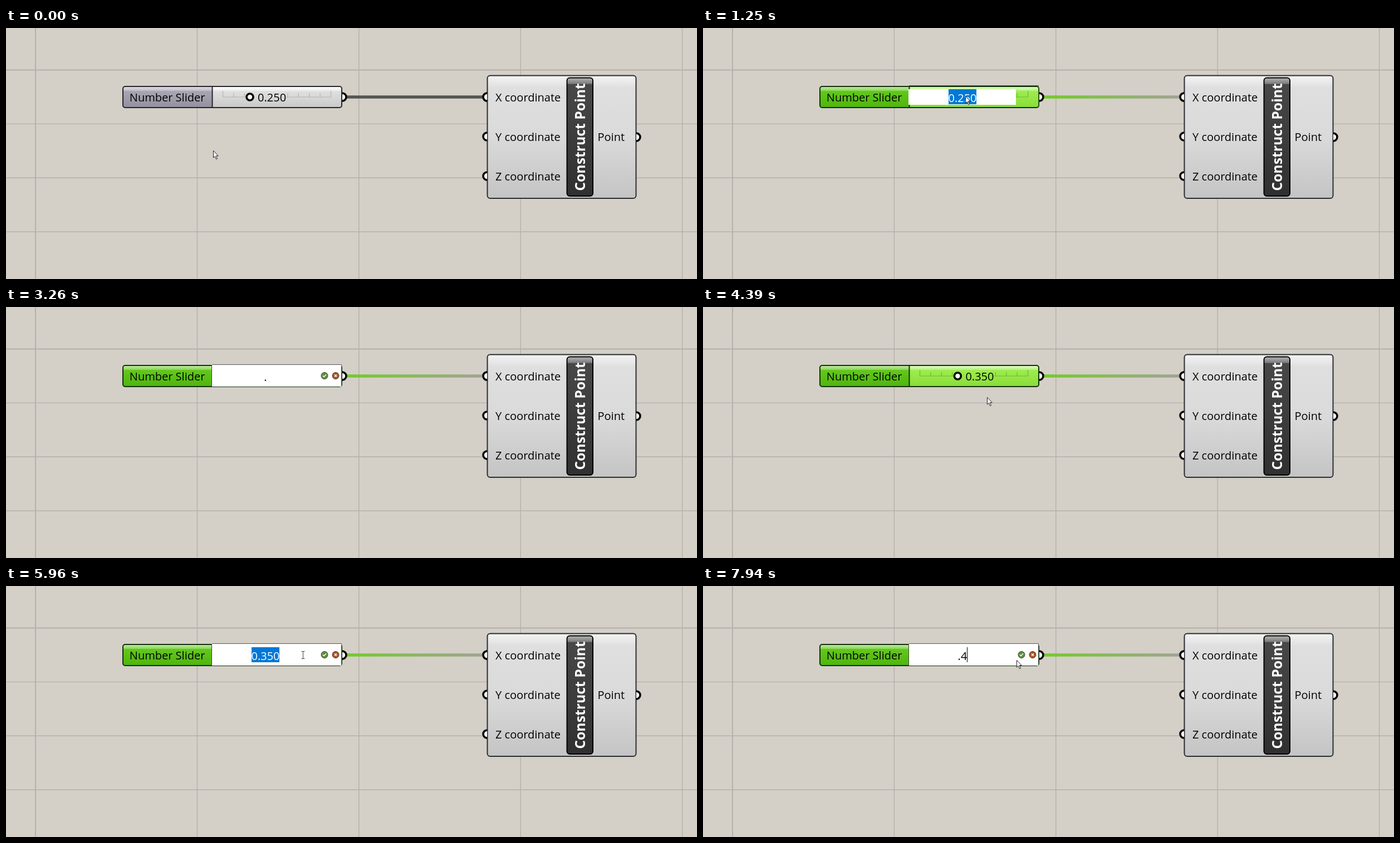
These frames come from a looping animation (1241 by 451 pixels, 8000 ms). An HTML page:

```html
<!DOCTYPE html>
<html lang="en">
<head>
<meta charset="utf-8">
<title>Number slider</title>
<style>
  html, body { margin: 0; width: 100%; height: 100%; overflow: hidden; background: #d4cfc7; }
  svg { display: block; width: 100%; height: 100%; }
  text { font: 20px "Open Sans", "Noto Sans", sans-serif; fill: #000; }
  .name { font-size: 24.8px; font-weight: 700; fill: #fff; }
  .selected { fill: #fff; }
</style>
</head>
<body>
<svg id="stage" viewBox="0 0 1241 451">
  <defs id="defs"></defs>
  <g id="back"></g>
  <g id="slider"></g>
  <g id="editor"></g>
  <g id="pointer"></g>
</svg>
<script>
const LOOP = 8000;
const TRACK = { x: 389.5, width: 194, y: 124 };
const EDIT_CENTER = 466;

// Pointer path: time, x, y
const PATH = [
  [230, 372, 220], [860, 471, 122], [1320, 471, 122], [1720, 510, 162],
  [5250, 510, 162], [5320, 511, 148], [5590, 524, 124], [5850, 524, 124],
  [5960, 533, 124], [6090, 537, 124], [6150, 543, 142], [7935, 543, 142], [7940, 563, 133]
];

// Field content while editing: time, text, selected, caret
const EDITS = [
  [1250, "0.250", true, false], [2050, "0.250", true, true], [2580, "0.250", true, false],
  [2710, ".", false, true], [3260, ".", false, false], [3330, ".3", false, true],
  [3530, ".35", false, true], [4060, ".35", false, false],
  [5780, "0.350", true, false], [6750, "0.350", true, true],
  [7080, ".", false, true], [7540, ".4", false, true]
];

const $ = id => document.getElementById(id);
const between = (t, a, b) => t >= a && t < b;
const rect = (x, y, w, h, fill, extra = "") =>
  `<rect x="${x}" y="${y}" width="${w}" height="${h}" fill="${fill}" ${extra}/>`;
const path = (d, stroke, width = 1) =>
  `<path d="${d}" fill="none" stroke="${stroke}" stroke-width="${width}"/>`;
const label = (x, y, s, extra = "") => `<text x="${x}" y="${y}" ${extra}>${s}</text>`;
const gradient = (id, stops, attrs = 'x2="0" y2="1"') =>
  `<linearGradient id="${id}" ${attrs}>` +
  stops.map(([at, color]) => `<stop offset="${at}" stop-color="${color}"/>`).join("") +
  "</linearGradient>";

// Half-round connector; side is 1 for outputs and -1 for inputs
const port = (x, y, side) =>
  `<path d="M${x} ${y - 7}a7 7 0 0 ${side > 0 ? 1 : 0} 0 14" fill="#fff" stroke="#000" stroke-width="3.6"/>`;

function drawDefs() {
  $("defs").innerHTML =
    gradient("panel", [[0, "#f4f4f4"], [.06, "#e8e8e8"], [.1, "#dfdfdf"], [.5, "#dadada"], [1, "#c4c4c4"]]) +
    gradient("plate", [[0, "#b4b4b4"], [.05, "#7c7c7c"], [.055, "#484848"], [1, "#303030"]]) +
    gradient("nameGrey", [[0, "#e2e1e6"], [.2, "#c0bdc8"], [.22, "#a9a6b4"], [1, "#94909f"]]) +
    gradient("bodyGrey", [[0, "#ffffff"], [.2, "#ececec"], [.22, "#e0e0e0"], [1, "#c9c9c9"]]) +
    gradient("nameGreen", [[0, "#c4eea6"], [.2, "#8cd75a"], [.22, "#62c81c"], [1, "#50b40e"]]) +
    gradient("bodyGreen", [[0, "#e2fdcb"], [.2, "#b4f37c"], [.22, "#9dec50"], [1, "#89dd37"]]) +
    gradient("wire", [[0, "#72cb27"], [1, "#a0a394"]],
      'gradientUnits="userSpaceOnUse" x1="611" y1="0" x2="857" y2="0"');
}

function drawBack() {
  let s = "";
  for (let i = 0; i < 5; i++) s += path(`M${53 + i * 290.4} 0V451`, "#b5b1aa", i ? 1.4 : 2);
  for (let i = 0; i < 4; i++) s += path(`M0 ${75.5 + i * 96.9}H1241`, "#b5b1aa", i ? 1.4 : 2);
  s += rect(864.5, 85.5, 267, 220.5, "url(#panel)", 'rx="5" stroke="#2b2c33" stroke-width="2"');
  s += rect(1007.5, 89.5, 46.5, 212.5, "url(#plate)", 'rx="5" stroke="#000" stroke-width="2"');
  s += label(0, 0, "Construct Point", 'class="name" text-anchor="middle" transform="translate(1040 196) rotate(-90)"');
  ["X", "Y", "Z"].forEach((axis, i) => {
    s += label(879, 131.5 + i * 71, axis + " coordinate");
    s += port(864, 124 + i * 71, -1);
  });
  s += label(1062.5, 203, "Point") + port(1132, 196, 1);
  $("back").innerHTML = s;
}

function trackMarks(value) {
  const knob = TRACK.x + TRACK.width * value;
  const resume = knob + 66;
  let d = `M${TRACK.x} ${TRACK.y}H${knob}M${resume} ${TRACK.y}H${TRACK.x + TRACK.width}`;
  for (let i = 0; i <= 10; i++) {
    const x = TRACK.x + TRACK.width * i / 10;
    if (x < knob || x > resume) d += `M${x} ${TRACK.y}V${i % 10 ? 117 : 113}`;
  }
  return d;
}

function sliderView(value, green) {
  const tone = green ? "Green" : "Grey";
  const edge = green ? "#10300a" : "#26262a";
  const knob = TRACK.x + TRACK.width * value;
  return path("M609 124H857", green ? "url(#wire)" : "#555550", 5.4) +
    port(864, 124, -1) +
    rect(210, 105, 393, 38, `url(#body${tone})`, 'rx="4"') +
    `<path d="M371 105H214a4 4 0 0 0-4 4V139a4 4 0 0 0 4 4H371z" fill="url(#name${tone})"/>` +
    path("M370.5 105V143", edge, 2) +
    rect(210, 105, 393, 38, "none", `rx="4" stroke="${edge}" stroke-width="2"`) +
    path(trackMarks(value), green ? "#70b636" : "#b4b4b4", 1.2) +
    label(221.8, 131.5, "Number Slider") +
    `<circle cx="${knob}" cy="124" r="6" fill="#fff" stroke="#000" stroke-width="3.6"/>` +
    label(knob + 14, 131.5, value.toFixed(3)) +
    port(604, 124, 1);
}

function fieldView(text, selected, caret) {
  const half = (4.9 + 11.2 * (text.length - 1)) / 2;
  return (selected ? rect(441, 110, 50, 27, "#0078d7") : "") +
    label(EDIT_CENTER, 132.7, text, `text-anchor="middle" class="${selected ? "selected" : ""}"`) +
    (caret ? rect(selected ? 491 : Math.floor(EDIT_CENTER + half), 110, 1, 27, "#000") : "");
}

const button = (x, color, mark) =>
  `<circle cx="${x}" cy="123.5" r="6" fill="${color}" stroke="#4d4030"/>` + path(mark, "#fff", 1.5);

function editorView(t) {
  const opening = between(t, 1120, 1320) || between(t, 5720, 5850);
  const open = between(t, 1320, 4390) || t >= 5850;
  if (!opening && !open) return "";
  const frame = path("M370 103.5H602.5V143", opening ? "#3f682b" : "#55585a");
  const edit = EDITS.filter(e => e[0] <= t).pop();
  const field = edit && !between(t, 4390, 5780) ? fieldView(...edit.slice(1)) : "";
  // The field paints before the rest of the form
  if (opening) return frame + (field && rect(369, 110, 193, 28, "#fff") + field);
  return rect(369, 103, 234, 40, "#fff") + path("M369.5 143V104", "#39492f") + frame + field +
    button(572, "#5d9140", "M569 123.5l2 2 4-4") +
    button(592, "#ae5126", "M590 121.5l4 4m0-4l-4 4");
}

function pointerAt(t) {
  const next = PATH.findIndex(p => p[0] > t);
  if (next === 0) return PATH[0].slice(1);
  if (next < 0) return PATH[PATH.length - 1].slice(1);
  const [t0, x0, y0] = PATH[next - 1], [t1, x1, y1] = PATH[next];
  const steps = Math.max(1, Math.round((t1 - t0) / 68));
  const p = Math.floor((t - t0) / (t1 - t0) * steps + 1e-6) / steps;
  const eased = p * p * (3 - 2 * p);
  return [x0 + (x1 - x0) * eased, y0 + (y1 - y0) * eased].map(Math.round);
}

function pointerView(t) {
  if (between(t, 2710, 4390) || between(t, 7080, 7940)) return "";
  const [x, y] = pointerAt(t);
  const at = `<g transform="translate(${x + .5} ${y + .5})">`;
  const editing = between(t, 1320, 4390) || t >= 5850;
  const shape = editing && x < 562 && y < 138
    ? path("M-3-7H3M0-7V6M-3 6H3", "#444")
    : '<path d="M0 0V12.5L2.8 9.9 5 15.2 7 14.3 4.8 9.2H8.7Z" fill="#fff" stroke="#222"/>';
  return at + shape + "</g>";
}

function update(id, markup) {
  const node = $(id);
  if (node.markup !== markup) node.innerHTML = node.markup = markup;
}

function render(t) {
  update("slider", sliderView(t < 4390 ? .25 : .35, t >= 990));
  update("editor", editorView(t));
  update("pointer", pointerView(t));
}

drawDefs();
drawBack();
render(0);
const start = performance.now();
function tick() {
  render((performance.now() - start) % LOOP);
  requestAnimationFrame(tick);
}
requestAnimationFrame(tick);
</script>
</body>
</html>
```
